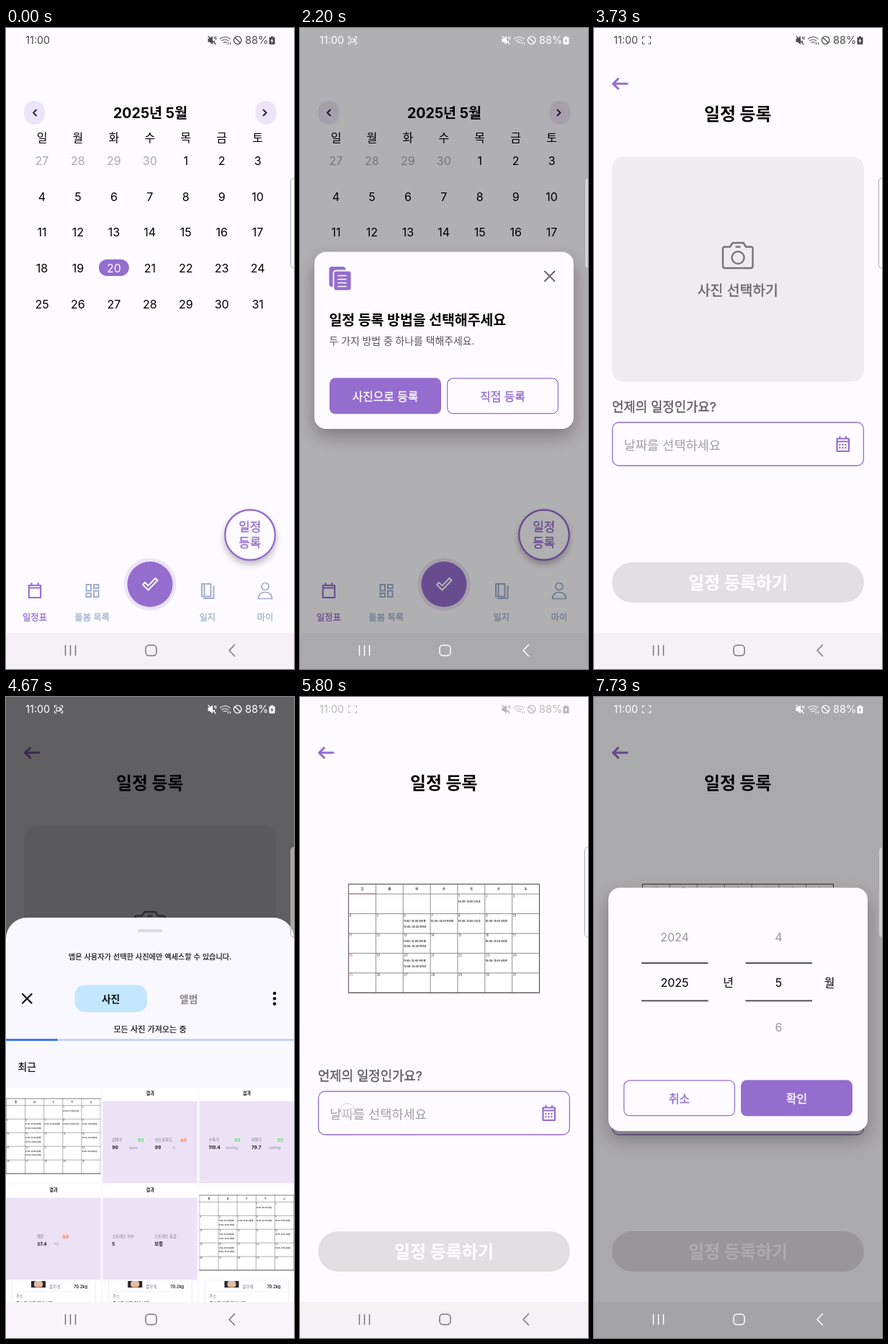
An HTML page for the animation above (8000 ms loop, 400 by 889 pixels).

```html
<!DOCTYPE html>
<html lang="ko">
<head>
<meta charset="utf-8">
<title>일정 등록</title>
<style>
html, body { margin: 0; width: 100%; height: 100%; overflow: hidden; background: #fdfbff; }
svg { position: fixed; inset: 0; width: 100%; height: 100%; display: block; }
text { font-family: Inter, "Noto Sans CJK KR", "Noto Sans CJK", sans-serif; white-space: pre; }
.line { fill: none; stroke: currentColor; stroke-linecap: round; stroke-linejoin: round; }
.card { filter: drop-shadow(0 11px 13px rgba(0,0,0,.3)); }
.fab { filter: drop-shadow(0 5px 4px rgba(0,0,0,.25)); }

#home, #register, #choose, #picker, #shade, #empty, #chosen, #month, #tap, #status, #nav, #rec {
  animation: 8s linear infinite;
}
#home { animation-name: home; }
#register { animation-name: register; }
#choose { animation-name: choose; }
#shade { animation-name: shade; }
#picker { animation-name: picker; }
#empty { animation-name: empty; }
#chosen { animation-name: chosen; }
#month { animation-name: month; }
#tap { animation-name: tap; }
#status { animation-name: status; }
#nav { animation-name: nav; }
#rec { animation-name: rec; }
#lens { animation: lens 1s step-end infinite; }
#load { animation: load 8s linear infinite; }

@keyframes home { 0%, 40% { opacity: 1 } 40.1%, 100% { opacity: 0 } }
@keyframes register { 0%, 38.4% { opacity: 0 } 40%, 100% { opacity: 1 } }
@keyframes choose { 0%, 24.9% { opacity: 0 } 26.75%, 36.6% { opacity: 1 } 38.4%, 100% { opacity: 0 } }
@keyframes shade { 0%, 53.4% { opacity: 0 } 56.5%, 68.4% { opacity: .62 } 71.6%, 100% { opacity: 0 } }
@keyframes picker {
  0% { transform: translateY(589px) }
  53.4% { transform: translateY(589px); animation-timing-function: cubic-bezier(.1,.7,.2,1) }
  57.5% { transform: none }
  68.4% { transform: none; animation-timing-function: cubic-bezier(.5,0,.9,.6) }
  71.6%, 100% { transform: translateY(589px) }
}
@keyframes load { 0%, 57.1% { transform: scaleX(0) } 64.3%, 100% { transform: none } }
@keyframes empty { 0%, 69% { opacity: 1 } 69.1%, 100% { opacity: 0 } }
@keyframes chosen { 0%, 69% { opacity: 0 } 69.1%, 100% { opacity: 1 } }
@keyframes month { 0%, 85.9% { opacity: 0 } 87.9%, 100% { opacity: 1 } }
@keyframes tap { 0%, 67.4% { opacity: 0 } 67.6%, 72.5% { opacity: 1 } 74%, 100% { opacity: 0 } }
@keyframes status {
  0%, 24.9% { color: #4a494c } 26.75%, 36.6% { color: #fff } 39%, 53.4% { color: #4a494c }
  56%, 71.2% { color: #fff } 74.5%, 85.9% { color: #4a494c } 87.9%, 100% { color: #fff }
}
@keyframes nav {
  0%, 24.9% { color: #777579 } 26.75%, 36.6% { color: #fff } 38.4%, 85.9% { color: #777579 }
  87.9%, 100% { color: #fff }
}
@keyframes rec { 0%, 2.5% { opacity: 0 } 5.8%, 100% { opacity: 1 } }
@keyframes lens { 0% { opacity: 0 } 19.5% { opacity: 1 } 72.5%, 100% { opacity: 0 } }
</style>
</head>
<body>
<svg id="stage" viewBox="0 0 400 889" preserveAspectRatio="none"></svg>
<script>
const PURPLE = '#956dcf', PAGE = '#fdfbff', SOFT = '#ece4f7';

// Medium weight is drawn as regular with a hairline outline.
const text = (x, y, size, str, { w = 400, c = '#000', a = 'middle' } = {}) =>
  `<text x="${x}" y="${y}" font-size="${size}" font-weight="${w === 500 ? 400 : w}" fill="${c}" text-anchor="${a}"` +
  (w === 500 ? ` stroke="${c}" stroke-width="${size * .022}"` : '') + `>${str}</text>`;
const rect = (x, y, w, h, r, fill, extra = '') =>
  `<rect x="${x}" y="${y}" width="${w}" height="${h}" rx="${r}" fill="${fill}" ${extra}/>`;
const line = (d, w = 2, c = 'currentColor', extra = '') =>
  `<path class="line" d="${d}" stroke-width="${w}" style="stroke:${c}" ${extra}/>`;
const group = (id, body) => `<g id="${id}">${body}</g>`;
const at = (x, y, s, body) => `<g transform="translate(${x} ${y}) scale(${s})">${body}</g>`;
const range = n => [...Array(n).keys()];

function button(x, y, label, filled) {
  const box = filled ? rect(x, y, 155, 50, 8, PURPLE)
    : rect(x + .6, y + .6, 153.8, 48.8, 8, 'none', `stroke="${PURPLE}" stroke-width="1.2"`);
  return box + text(x + 77.5, y + 31.2, 15.8, label, { w: 500, c: filled ? '#fff' : PURPLE });
}

function homePage() {
  const days = range(35).map(i => {
    const x = 50 + (i % 7) * 49.93, y = 190 + Math.floor(i / 7) * 49.65;
    const day = i < 4 ? 27 + i : i - 3, now = day === 20;
    return (now ? rect(x - 21, y - 18, 42, 23, 11.5, PURPLE) : '') +
      text(x, y, 16, day, { c: now ? '#fff' : i < 4 ? '#aaa8ac' : '#000' });
  }).join('');
  const week = [...'일월화수목금토'].map((d, i) => text(50 + i * 49.93, 158.3, 16, d)).join('');
  const blue = '#9fafcf';
  const tabs = [['일정표', 40, PURPLE], ['돌봄 목록', 119.7, blue], ['일지', 279.7, blue], ['마이', 360, blue]]
    .map(([s, x, c]) => text(x, 822.3, 12.3, s, { c, w: 500 })).join('');
  const tiles = [[111.5, 772, 6.5, 8.5], [111.5, 784, 6.5, 5], [122, 772, 6.5, 5], [122, 780.5, 6.5, 8.5]]
    .map(([x, y, w, h]) => rect(x, y, w, h, 0, 'none', `stroke="${blue}" stroke-width="2"`)).join('');
  return rect(0, 0, 400, 889, 0, PAGE) +
    rect(25, 101, 29, 33, 14.5, SOFT) + rect(346.5, 101, 29, 33, 14.5, SOFT) +
    line('M42 113.5l-4 4 4 4', 2, '#2c2638') + line('M357.5 113.5l4 4-4 4', 2, '#2c2638') +
    text(200.5, 125.2, 19.6, '2025년 5월', { w: 700 }) + week + days +
    `<circle class="fab" cx="339" cy="703" r="34.8" fill="${PAGE}" stroke="${PURPLE}" stroke-width="2.4"/>` +
    text(338.7, 698, 16.9, '일정', { w: 500, c: PURPLE }) + text(338.7, 719.5, 16.9, '등록', { w: 500, c: PURPLE }) +
    `<circle cx="200" cy="771.5" r="36.5" fill="${SOFT}"/><circle cx="200" cy="771.5" r="31.5" fill="${PURPLE}"/>` +
    line('M190 772l3-3 4.5 4.5L207.5 763l3 3-13 13.5z', 1.9, '#fff') +
    line('M31.8 773h16.4v17H31.8zM31.8 776.5h16.4M35.5 770v3M44.5 770v3', 2.1, PURPLE) + tiles +
    line('M272 771h12.5v17.5H272zM275.5 771v17.5M288.5 774v17H275', 2, blue) +
    line('M355 774.5a5 5 0 1 0 10 0a5 5 0 1 0-10 0M350.5 791.5c0-12 19-12 19 0z', 1.7, blue) + tabs;
}

function chooseDialog() {
  return rect(0, 0, 400, 889, 0, '#000', 'opacity=".3"') +
    rect(20, 310.5, 360, 245.5, 16, PAGE, 'class="card"') +
    rect(40.5, 331, 23, 28, 4, PURPLE) +
    rect(46.5, 336.5, 25, 28, 4, PURPLE, `stroke="${PAGE}" stroke-width="1.8"`) +
    line('M53 343.5h11M53 348.5h11M53 353.5h11M53 358.5h11', 1.7, '#fff') +
    line('M340 337.5l13.5 13.5M353.5 337.5l-13.5 13.5', 2, '#666468') +
    text(40.5, 412.3, 19.4, '일정 등록 방법을 선택해주세요', { w: 700, a: 'start' }) +
    text(40.5, 438.8, 13.86, '두 가지 방법 중 하나를 택해주세요.', { c: '#555358', a: 'start' }) +
    button(41, 485.3, '사진으로 등록', true) + button(204, 485.3, '직접 등록', false);
}

// Month sheet in units where a column is 100 wide.
function table() {
  const top = r => 36 + r * 72.4;
  const who = ['나도윤', '하은채', '문지호', '서다온'];
  const noon = '12:00~13:00 ', pair = ['11:00~12:00 ' + who[1], '13:00~14:00 ' + who[2]], late = ['10:00~11:00 ' + who[3]];
  const plan = { 1: [noon + who[0]], 6: pair, 7: [noon + who[1]], 8: [noon + who[0]], 9: late, 13: pair, 16: late, 20: pair, 23: late };
  const heads = [...'일월화수목금토'].map((d, i) => text(50 + i * 100, 23, 11, d, { w: 500 })).join('');
  const cells = range(31).map(i => {
    const x = ((i + 4) % 7) * 100 + 3, y = top(Math.floor((i + 4) / 7)), d = i + 1;
    return text(x, y + 12, 11, d, { a: 'start', c: d === 18 || d === 25 ? '#e0443a' : '#333' }) +
      (plan[d] || []).map((s, k) => text(x - 1, y + 31 + k * 20, 9, s, { w: 700, a: 'start', c: '#222' })).join('');
  }).join('');
  const cols = range(8).map(i => `M${i * 100} 0V398`).join('');
  const rows = range(6).map(r => `M0 ${top(r)}H700`).join('');
  return rect(0, 0, 700, 398, 0, '#fff') + line(cols + rows, 2.3, '#7d7b7f') +
    line('M0 0H700V398H0z', 2.6, '#444') + line('M0 35H100', 3, '#ee6a5c') + heads + cells;
}

function registerPage() {
  const gray = '#77757a';
  const empty = rect(25, 178.5, 350, 312, 16, '#eeecef') +
    line('M182 303.5h7l3.5-5.5h15l3.5 5.5h7q2.5 0 2.5 2.5v24q0 3-3 3H182q-3 0-3-3v-24q0-2.5 3-2.5zM191.5 318.5a8.5 8.5 0 1 0 17 0a8.5 8.5 0 1 0-17 0M197.5 303.5h5', 2.4, gray) +
    text(199.7, 371.3, 19.3, '사진 선택하기', { w: 500, c: '#69676c' });
  const dots = range(6).map(i => rect(340.3 + (i % 3) * 4, 577 + Math.floor(i / 3) * 4, 2.2, 2.2, .4, PURPLE)).join('');
  return rect(0, 0, 400, 889, 0, PAGE) +
    line('M46 77.3H27M33.5 70.5l-7 6.8 7 6.8', 3, PURPLE) +
    text(199.7, 128, 23.8, '일정 등록', { w: 700 }) +
    group('empty', empty) + group('chosen', at(67.5, 259.5, .3786, table())) +
    text(25, 531.5, 17.75, '언제의 일정인가요?', { w: 500, c: '#5f5d62', a: 'start' }) +
    rect(25.6, 547, 348.8, 60, 9, PAGE, `stroke="${PURPLE}" stroke-width="1.3"`) +
    text(41.5, 585, 17.6, '날짜를 선택하세요', { c: '#a09ea3', a: 'start' }) +
    line('M337.5 569.5h16.5v17.5h-16.5zM337.5 573.5h16.5M341.5 567v2.5M350 567v2.5', 2.2, PURPLE) + dots +
    rect(25, 741, 350, 56, 28, '#e2dfe2') + text(200, 778, 24, '일정 등록하기', { w: 700, c: '#fff' });
}

// Thumbnail in half-size units; each item is [x, label, value, unit, tag].
function result(...items) {
  const tint = { 정상: ['#dcf3e2', '#2e9a55'], 높음: ['#fbd9d6', '#dd4b40'] }, y = 147;
  return rect(0, 0, 264, 264, 0, '#fff') + rect(0, 37, 264, 227, 0, '#ebe2f5') +
    text(132, 20, 12.5, '결과', { w: 700, c: '#222' }) +
    items.map(([x, label, value, unit = '', tag]) =>
      text(x, y, 10.6, label, { c: '#77747c', a: 'start' }) +
      text(x, y + 23, 13, value, { w: 700, c: '#1c1b1e', a: 'start' }) +
      text(x + 48, y + 23, 10.5, unit, { c: '#8d8a92', a: 'start' }) +
      (tag ? rect(x + 68, y - 10, 24, 13, 5, tint[tag][0]) + text(x + 80, y, 9, tag, { c: tint[tag][1] }) : '')).join('');
}

function profile() {
  return rect(0, 0, 264, 60, 0, '#fff') + line('M16 0V60M248 0V60', 1.2, '#dddbe0') +
    rect(70, 0, 40, 18, 0, '#2b2629') + rect(78, 0, 24, 17, 7, '#e4bda5') +
    text(120, 20, 11, '몸무게', { c: '#77747c', a: 'start' }) +
    text(226, 20, 11.5, '70.2kg', { w: 600, c: '#222', a: 'end' }) +
    line('M28 29H236', 1, '#e6e4e9') +
    text(28, 45, 10.5, '주소', { c: '#77747c', a: 'start' }) +
    text(28, 65, 11.5, '주소가 아직 없습니다', { w: 500, c: '#222', a: 'start' });
}

function pickerSheet() {
  const ink = { w: 500, c: '#111' };
  const photo = rect(0, 0, 264, 264, 0, '#fff') + at(-51.4, 30, .5226, table());
  const thumbs = [
    photo,
    result([26, '심박수', '90', 'bpm', '정상'], [145, '산소포화도', '99', '%', '높음']),
    result([26, '수축기', '119.4', 'mmHg', '정상'], [145, '이완기', '79.7', 'mmHg', '정상']),
    result([86, '체온', '37.4', '℃', '높음']),
    result([26, '스트레스 지수', '5'], [144, '스트레스 등급', '보통']),
    photo, profile(), profile(), profile()
  ].map((body, i) => at((i % 3) * 134.2, 542 + Math.floor(i / 3) * 134, .5, `<g clip-path="url(#square)">${body}</g>`)).join('');
  return '<clipPath id="square"><path d="M0 0H263V264H0z"/></clipPath>' +
    '<path d="M0 889V335A29 29 0 0 1 29 306H371A29 29 0 0 1 400 335V889z" fill="#faf8ff"/>' +
    rect(183, 322, 34, 4.5, 2.2, '#dedce3') +
    text(200, 364.3, 10.2, '앱은 사용자가 선택한 사진에만 액세스할 수 있습니다.', ink) +
    line('M23 412l12.5 12.5M35.5 412L23 424.5', 2.2, '#111') +
    rect(95.5, 399.5, 100.5, 37.5, 14, '#c2e7ff') +
    text(145.6, 423.5, 13.8, '사진', { w: 700, c: '#111' }) + text(253.7, 423.5, 13.8, '앨범', { w: 700, c: '#8a888e' }) +
    [411, 418.3, 425.5].map(y => `<circle cx="373" cy="${y}" r="2.3" fill="#111"/>`).join('') +
    text(200, 465, 11.1, '모든 사진 가져오는 중', ink) +
    rect(0, 474, 400, 3, 0, '#c3d6f8') + rect(0, 474, 400, 3, 0, '#3b78f0', 'id="load"') +
    text(16.5, 517.5, 13.8, '최근', { ...ink, a: 'start' }) + thumbs +
    rect(0, 839, 400, 50, 0, '#f7f5fa');
}

function monthDialog() {
  const gray = { c: '#99979c' };
  return rect(0, 0, 400, 889, 0, '#000', 'opacity=".325"') +
    rect(20, 264.5, 360, 337.5, 16, PAGE, 'class="card"') +
    text(112, 339.3, 16, '2024', gray) + text(112, 401.8, 16, '2025') + text(186.5, 402, 16, '년') +
    text(256.5, 339.3, 16, '4', gray) + text(256.5, 401.8, 16, '5') +
    text(256.5, 464.3, 16, '6', gray) + text(327, 402, 16, '월') +
    [[66, 369], [66, 421.3], [210.5, 369], [210.5, 421.3]].map(([x, y]) => rect(x, y - 1, 92.5, 2, 0, '#555358')).join('') +
    button(41, 531.3, '취소', false) + button(204, 531.3, '확인', true);
}

function statusBar() {
  const ink = 'currentColor';
  return text(27.3, 22.3, 14.3, '11:00', { c: ink, a: 'start' }) +
    group('rec', line('M67.5 14.5v-2.5h2.5M76 12h2.5v2.5M78.5 19.5v2.5H76M70 22h-2.5v-2.5', 1.2) +
      group('lens', line('M70 14.8h5v4.6h-5zM75 16.5l2-1v3.3l-2-1', 1.1))) +
    `<path d="M280.5 14.5h2.5l4-3.5v12l-4-3.5h-2.5z" fill="${ink}"/>` +
    line('M281 11.5l10 11M289.5 12.5v2M291.5 12v4M289.5 18v1.5', 1.2) +
    line('M297.5 15a10 10 0 0 1 13.5 0M299.7 17.7a7 7 0 0 1 9 0M302 20.2a3.5 3.5 0 0 1 4.5 0M308.5 20v2.5M311.5 20v2.5', 1.2, ink, 'opacity=".85"') +
    line('M316.4 17a5.3 5.3 0 1 0 10.6 0a5.3 5.3 0 1 0-10.6 0M318 13.2l7.5 7.6', 1.3) +
    text(332, 22.3, 14.6, '88%', { c: ink, a: 'start' }) +
    `<path fill-rule="evenodd" fill="${ink}" d="M368 11.5h3v1.2h1.5q1 0 1 1v8q0 1-1 1h-6q-1 0-1-1v-8q0-1 1-1h1.5zM370.3 14l-3 4.2h1.8l-.6 3.3 3-4.3h-1.7z"/>`;
}

const navIcons = line('M82.5 856.5v13.5M89.5 856.5v13.5M96.5 856.5v13.5', 1.5) +
  rect(194, 856, 15, 14.5, 4.5, 'none', 'class="line" stroke-width="1.5"') +
  line('M317.5 855.5l-7.5 7.7 7.5 7.7', 1.5);

document.getElementById('stage').innerHTML =
  group('home', homePage()) + group('register', registerPage()) +
  rect(0, 839, 400, 50, 0, '#f4f2f5') +
  group('choose', chooseDialog()) + rect(0, 0, 400, 889, 0, '#000', 'id="shade"') +
  group('picker', pickerSheet()) + group('month', monthDialog()) +
  '<circle id="tap" cx="66" cy="573" r="9.5" fill="rgba(255,255,255,.3)" stroke="#cfcdd2" stroke-width="1"/>' +
  rect(395.5, 208, 12, 125.5, 5, 'rgba(255,255,255,.45)', 'stroke="#a9a7ac" stroke-width="1"') +
  group('status', statusBar()) + group('nav', navIcons);
</script>
</body>
</html>
```
